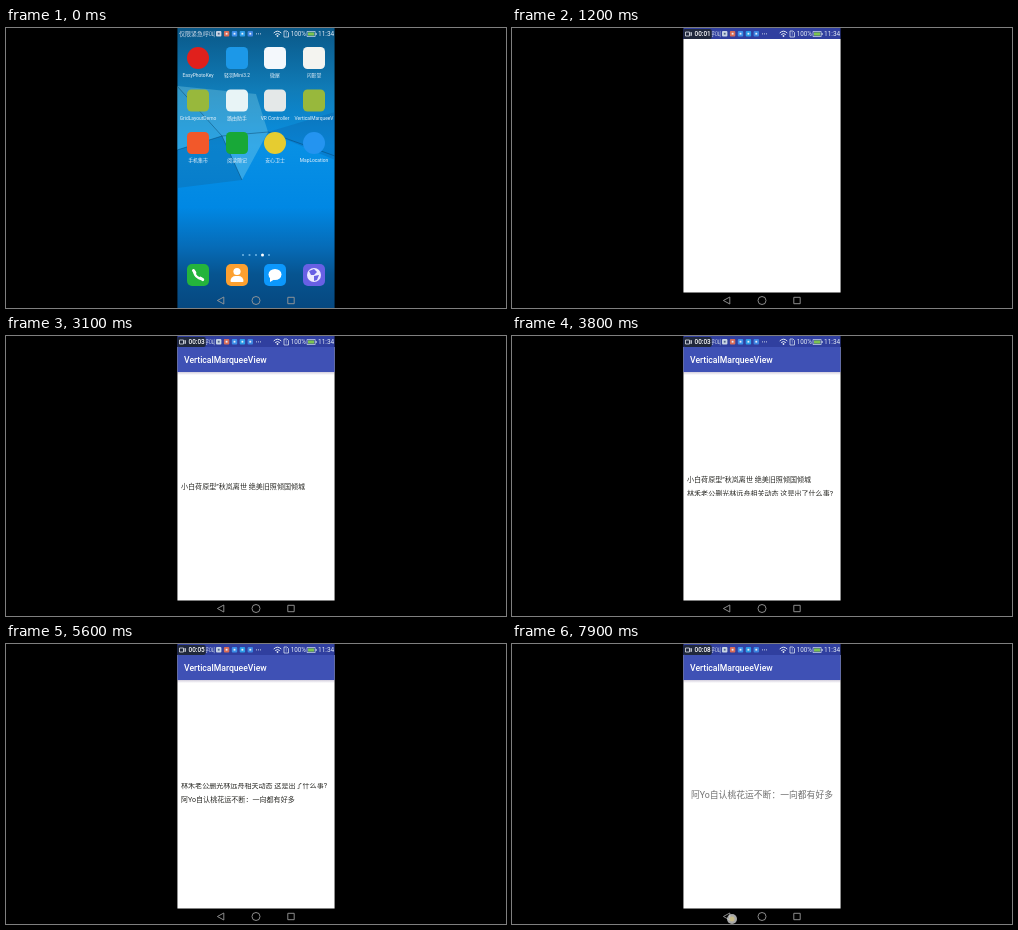
An HTML page with a canvas for the animation above (8 s loop, 500x280 px).

```html
<!DOCTYPE html>
<html lang="zh">
<head>
<meta charset="utf-8">
<style>
  html, body { margin: 0; width: 100%; height: 100%; overflow: hidden; background: #000; }
  canvas { display: block; width: 500px; height: 280px; }
</style>
</head>
<body>
<canvas id="stage" width="500" height="280"></canvas>
<script>
const ctx = document.getElementById('stage').getContext('2d');
const LOOP = 8000;
const FONT = 'Roboto, "Noto Sans CJK SC", "Noto Sans CJK", sans-serif';
const LEFT = 171.25, WIDTH = 157.5, BAR = 11, BOTTOM = 264.5;
const HEADLINES = [
  '小白荷原型”秋岚离世 绝美旧照倾国倾城',
  '林禾老公删光林远舟相关动态 这是出了什么事?',
  '阿Yo自认桃花运不断：一向都有好多'
];
const SCROLL_STARTS = [3200, 4850], SCROLL_TIME = 1200, LINE_GAP = 14;
const APPS = [
  ['EasyPhotoKey', '#e0201c', 'circle'], ['轻羽Mini3.2', '#1c98e8'],
  ['微屋', '#f4f8fc'], ['闪影堂', '#f4f4f0'],
  ['GridLayoutDemo', '#98b83c'], ['路由助手', '#e8f4f6'],
  ['VR Controller', '#e4e8e8'], ['VerticalMarqueeV', '#98b83c'],
  ['手机集市', '#f2582a'], ['阅读随记', '#18a838'],
  ['安心卫士', '#e6cc30', 'circle'], ['MapLocation', '#2494f0', 'circle']
];
const COLUMNS = [192, 231, 269, 308];

const clamp = x => Math.max(0, Math.min(1, x));
const progress = (t, start, length) => clamp((t - start) / length);

function rect(x, y, w, h, fill) {
  ctx.fillStyle = fill;
  ctx.fillRect(x, y, w, h);
}

function roundRect(x, y, w, h, r, fill) {
  ctx.fillStyle = fill;
  ctx.beginPath();
  ctx.roundRect(x, y, w, h, r);
  ctx.fill();
}

function circle(x, y, r, fill) {
  ctx.fillStyle = fill;
  ctx.beginPath();
  ctx.arc(x, y, r, 0, Math.PI * 2);
  ctx.fill();
}

function text(s, x, y, size, fill, weight = 400, align = 'left') {
  ctx.font = `${weight} ${size}px ${FONT}`;
  ctx.textAlign = align;
  ctx.textBaseline = 'alphabetic';
  ctx.fillStyle = fill;
  ctx.fillText(s, x, y);
}

function polygon(points, fill) {
  ctx.fillStyle = fill;
  ctx.beginPath();
  points.forEach(([x, y]) => ctx.lineTo(x, y));
  ctx.fill();
}

function stroke(path, color, width) {
  ctx.strokeStyle = color;
  ctx.lineWidth = width;
  ctx.stroke(new Path2D(path));
}

function clipped(x, y, w, h, draw) {
  ctx.save();
  ctx.beginPath();
  ctx.rect(x, y, w, h);
  ctx.clip();
  draw();
  ctx.restore();
}

function wallpaper() {
  const g = ctx.createLinearGradient(0, 0, 0, 280);
  [[0, '#0a5888'], [.22, '#107cb8'], [.42, '#0890e4'], [.64, '#0088e4'],
   [.78, '#066cb8'], [.88, '#065490'], [1, '#064880']].forEach(s => g.addColorStop(...s));
  rect(LEFT, 0, WIDTH, 280, g);
  polygon([[171, 58], [216, 108], [171, 122]], 'rgba(110,200,225,.35)');
  polygon([[171, 58], [250, 66], [262, 104], [216, 108]], 'rgba(150,220,235,.3)');
  polygon([[216, 108], [262, 104], [236, 152]], 'rgba(120,205,235,.4)');
  polygon([[171, 122], [216, 108], [236, 152], [171, 160]], 'rgba(20,90,130,.25)');
  polygon([[262, 104], [329, 84], [329, 132]], 'rgba(10,80,150,.25)');
  stroke('M171 58L216 108L262 104L329 128M171 122L216 108L236 152', 'rgba(10,50,80,.55)', .7);
}

function dock() {
  const y = 247;
  ['#24b43c', '#fca030', '#0c98fc', '#6860e4'].forEach((color, i) =>
    roundRect(COLUMNS[i] - 11, y - 11, 22, 22, 5, color));
  ctx.lineCap = 'round';
  stroke('M188 243Q189 250 196 251', '#fff', 2.2);
  stroke('M187.5 242.5l1.4 2.2M194.5 250.2l2.2 1.4', '#fff', 3);
  ctx.lineCap = 'butt';
  circle(231, 243.5, 3.6, '#fff');
  roundRect(224.5, 248, 13, 6, [5, 5, 1, 1], '#fff');
  ctx.fillStyle = '#fff';
  ctx.beginPath();
  ctx.ellipse(269, 246.5, 6.5, 5.5, 0, 0, Math.PI * 2);
  ctx.fill();
  polygon([[264, 249], [264, 254], [269, 251]], '#fff');
  circle(308, 247, 7, '#eceaff');
  polygon([[303, 243], [308, 241], [311, 244], [308, 247], [305, 247]], '#6860e4');
  polygon([[308, 248], [313, 247], [311, 252], [308, 253]], '#6860e4');
}

function homeScreen() {
  wallpaper();
  APPS.forEach(([label, color, shape], i) => {
    const x = COLUMNS[i % 4], y = 30 + Math.floor(i / 4) * 42.5;
    if (shape) circle(x, y, 11, color);
    else roundRect(x - 11, y - 11, 22, 22, 4.5, color);
    text(label, x, y + 19, 4.9, '#e8f2fa', 400, 'center');
  });
  for (let i = 0; i < 5; i++)
    circle(237 + i * 6.5, 227, i === 3 ? 1.5 : 1.1, i === 3 ? '#fff' : '#6ab0e0');
  dock();
}

function statusBar(t) {
  text('仅限紧急呼叫', 173, 8.2, 6, '#d4deec');
  ['#c8d4e4', '#d86c58', '#3c8ee8', '#2c9ce8', '#3c84e0'].forEach((color, i) => {
    const x = 210 + i * 7.9;
    roundRect(x, 3, 5.4, 5.4, 1, color);
    rect(x + 1.8, 4.8, 1.8, 1.8, i ? '#e8eef8' : '#50688c');
  });
  for (let i = 0; i < 3; i++) circle(250.5 + i * 2, 5.8, .6, '#c8d4e8');

  stroke('M267.7 5Q271.5 1.4 275.3 5M269.2 6.6Q271.5 4.4 273.8 6.6', '#e0e8f4', 1);
  circle(271.5, 8, .9, '#e0e8f4');
  stroke('M278 3h3l1.5 1.5v4.5h-4.5z', '#d4deee', .8);
  text('!', 279.5, 8.1, 5, '#d4deee');
  text('100%', 284.7, 8.2, 6.3, '#e4ecf6');
  stroke('M301 3.5h8.2v5h-8.2z', '#d4deec', .7);
  rect(302, 4.4, 6.2, 3.2, '#7cc450');
  rect(309.6, 5, 1, 2, '#d4deec');
  text('11:34', 312, 8.2, 6.5, '#e4ecf6');

  if (t < 400) return;
  roundRect(LEFT, 1, 28.5, 10, 2, '#20283c');
  stroke('M173.5 4h4v4h-4zM177.5 5.5l2-1v3l-2-1', '#e0e4ec', .8);
  const seconds = Math.floor((t + 155) / 990);
  text('00:0' + seconds, 182.5, 8.3, 6.4, '#fff', 500);
}

function navigation() {
  stroke('M217.8 269v7l-6.4-3.5z', '#9a9a9a', .9);
  stroke('M254 272.5a4 4 0 1 1-8 0a4 4 0 1 1 8 0', '#9a9a9a', .9);
  stroke('M281.8 269.3h6.4v6.4h-6.4z', '#9a9a9a', .9);
}

// Page frame shared by both screens, shifted sideways by dx.
function page(dx, content) {
  ctx.save();
  ctx.translate(dx, 0);
  rect(LEFT, BAR, WIDTH, BOTTOM - BAR, '#fff');
  rect(LEFT, BAR, WIDTH, 25, '#3f51b5');
  const shadow = ctx.createLinearGradient(0, 36, 0, 39);
  shadow.addColorStop(0, 'rgba(80,60,120,.25)');
  shadow.addColorStop(1, 'rgba(80,60,120,0)');
  rect(LEFT, 36, WIDTH, 3, shadow);
  text('VerticalMarqueeView', 178, 26.6, 8.65, '#fff', 500);
  content();
  ctx.restore();
}

function marquee(t) {
  const position = SCROLL_STARTS.reduce((sum, s) => sum + progress(t, s, SCROLL_TIME), 0);
  clipped(LEFT, 139, WIDTH, 21, () => HEADLINES.forEach((line, i) => {
    const offset = i - position;
    if (Math.abs(offset) < 1) text(line, 175, 152.8 + offset * LINE_GAP, 7.05, '#282824');
  }));
}

function appScreens(t) {
  const slide = 1 - (1 - progress(t, 6200, 540)) ** 2;
  if (slide < 1) {
    page(-17 * slide, () => marquee(t));
    rect(LEFT, BAR, WIDTH, BOTTOM - BAR, `rgba(40,10,90,${.12 * slide})`);
  }
  if (slide > 0)
    page(WIDTH * (1 - slide), () => text(HEADLINES[2], 179, 153.6, 8.8, '#707070'));
}

function openingWindow(t) {
  const p = progress(t, 800, 250), scale = 1 - .3 * (1 - p) ** 2;
  ctx.save();
  ctx.globalAlpha = p;
  ctx.translate(250, 140);
  ctx.scale(scale, scale);
  ctx.translate(-250, -140);
  rect(LEFT, 0, WIDTH, 280, '#000');
  rect(LEFT, 0, WIDTH, BAR, '#303f9f');
  rect(LEFT, BAR, WIDTH, BOTTOM - BAR, '#fff');
  ctx.restore();
}

function touch(x, y) {
  circle(x, y, 5, 'rgba(225,225,225,.75)');
  circle(x, y, 2.5, '#c8bc88');
}

function draw(t) {
  rect(0, 0, 500, 280, '#000');
  clipped(LEFT, 0, WIDTH, 280, () => {
    if (t < 1400) {
      if (t < 1050) homeScreen();
      if (t >= 800) openingWindow(t);
    } else {
      rect(LEFT, 0, WIDTH, BAR, '#303f9f');
      appScreens(t);
    }
    statusBar(t);
    navigation();
    if (t >= 7900) touch(220, 275);
  });
}

function frame() {
  draw(performance.now() % LOOP);
  requestAnimationFrame(frame);
}
frame();
</script>
</body>
</html>
```
